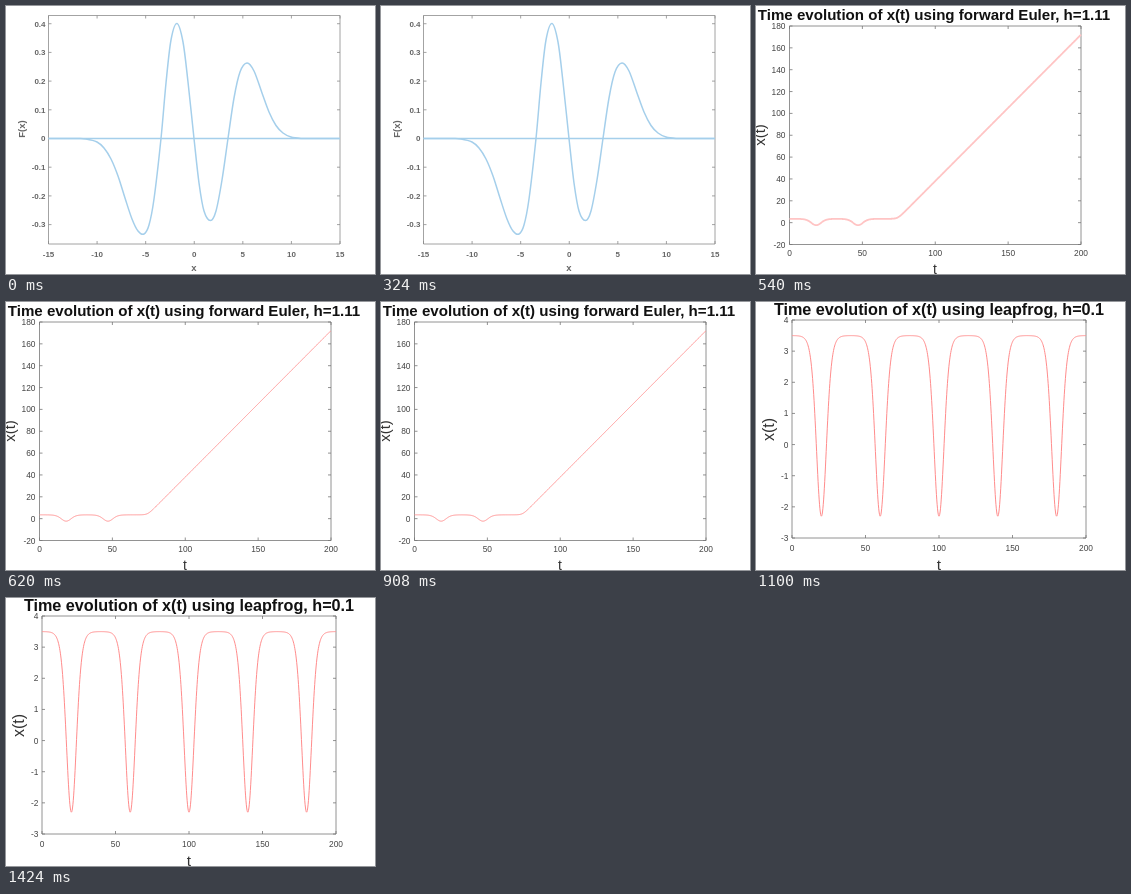
These frames come from a looping animation (369 px wide and 268 px high, 1.64 s). An HTML page:

```html
<!DOCTYPE html>
<html lang="en">
<head>
<meta charset="utf-8">
<title>Force and time evolution</title>
<style>
  html, body { margin: 0; width: 100%; height: 100%; overflow: hidden; background: #fff; }
  svg { display: block; width: 369px; height: 268px; }
  text { font-family: "Liberation Sans", Arial, sans-serif; }
  path { fill: none; }
</style>
</head>
<body>
<svg id="stage" viewBox="0 0 369 268"></svg>
<script>
const LOOP = 1640;
const stage = document.getElementById('stage');

function add(parent, tag, attrs, content) {
  const node = document.createElementNS('http://www.w3.org/2000/svg', tag);
  for (const key in attrs) node.setAttribute(key, attrs[key]);
  if (content !== undefined) node.textContent = content;
  parent.append(node);
  return node;
}

function label(parent, x, y, content, size, fill, extra = {}) {
  add(parent, 'text', { x, y, 'font-size': size, fill, 'text-anchor': 'middle', ...extra }, content);
}

// Boxed axes with inward ticks on all four sides.
function makePlot({ box: [l, t, r, b], xs: [x0, x1, dx], ys: [y0, y1, dy], ink, text, weight = 400, size, xBase, yEnd }) {
  const g = add(stage, 'g', {});
  const px = v => l + (v - x0) / (x1 - x0) * (r - l);
  const py = v => b - (v - y0) / (y1 - y0) * (b - t);
  const tick = 3, style = { 'font-weight': weight };
  let d = `M${l} ${t}H${r}V${b}H${l}Z`;
  for (let v = x0; v <= x1 + 1e-9; v += dx) {
    d += `M${px(v)} ${b}v${-tick}M${px(v)} ${t}v${tick}`;
    label(g, px(v), xBase, v, size, text, style);
  }
  for (let k = Math.ceil(y0 / dy); k * dy <= y1 + 1e-9; k++) {
    const v = k * dy;
    d += `M${l} ${py(v)}h${tick}M${r} ${py(v)}h${-tick}`;
    label(g, yEnd, py(v) + size * 0.36, +v.toFixed(1), size, text, { ...style, 'text-anchor': 'end' });
  }
  add(g, 'path', { d, stroke: ink, 'stroke-width': 0.8 });
  const curve = (f, stroke, width) => {
    const pts = [];
    for (let i = 0; i <= 800; i++) {
      const v = x0 + (x1 - x0) * i / 800;
      pts.push(px(v).toFixed(2) + ' ' + py(f(v)).toFixed(2));
    }
    return add(g, 'path', { d: 'M' + pts.join('L'), stroke, 'stroke-width': width, 'stroke-linejoin': 'round' });
  };
  return { g, curve };
}

function upright(g, x, y, content, size, fill, extra) {
  label(g, 0, 0, content, size, fill, { transform: `translate(${x} ${y}) rotate(-90)`, ...extra });
}

function smoothPath(p) {
  let d = 'M' + p[0];
  for (let i = 0; i < p.length - 1; i++) {
    const a = p[Math.max(i - 1, 0)], b = p[i], c = p[i + 1], e = p[Math.min(i + 2, p.length - 1)];
    d += `C${b[0] + (c[0] - a[0]) / 6} ${b[1] + (c[1] - a[1]) / 6} ` +
         `${c[0] - (e[0] - b[0]) / 6} ${c[1] - (e[1] - b[1]) / 6} ${c}`;
  }
  return d;
}

// Force
const force = makePlot({
  box: [42.5, 9.5, 334, 238], xs: [-15, 15, 5], ys: [-0.3676, 0.4286, 0.1],
  ink: '#8c8c8c', text: '#666', weight: 700, size: 8, xBase: 251, yEnd: 39.5
});
const forcePoints = [
  [42.5, 132.6], [70, 132.6], [80, 133], [91, 136], [98, 142], [105, 153], [112, 170], [119, 192],
  [126, 213], [132, 225], [138, 228], [143, 219], [148, 193], [155, 132.5], [160, 77], [165, 34],
  [171, 17.5], [177, 36], [182, 76], [188, 132.5], [193, 177], [198, 205], [204.5, 214.5],
  [210, 205], [216, 174], [222, 132.5], [228, 92], [234, 66], [241, 57], [248, 65], [256, 87],
  [263, 106], [270, 119.5], [277, 127], [285, 131], [295, 132.4], [310, 132.6], [334, 132.6]
];
add(force.g, 'path', { d: 'M42.5 132.6H334', stroke: '#a5cfeb', 'stroke-width': 1.5 });
add(force.g, 'path', { d: smoothPath(forcePoints), stroke: '#a5cfeb', 'stroke-width': 1.5 });
label(force.g, 188, 264.5, 'x', 9.5, '#666', { 'font-weight': 700 });
upright(force.g, 18.5, 123, 'F(x)', 9.5, '#666', { 'font-weight': 700 });

// Resting at 3.5 with a swing through the well, centred on t = 0.
const swing = t => 5.8 / (1 + 0.31 * (Math.cosh(0.52 * t) - 1));

// Forward Euler
const euler = makePlot({
  box: [33.5, 20, 325, 238.5], xs: [0, 200, 50], ys: [-20, 180, 20],
  ink: '#777', text: '#444', size: 8.4, xBase: 250, yEnd: 29.5
});
const escape = t => 1.34 * 1.3 * Math.log(1 + Math.exp((t - 74.2) / 1.3));
const eulerCurve = euler.curve(t => 3.5 - swing(t - 18.3) - swing(t - 47) + escape(t), '#ff9292', 1);
label(euler.g, 178, 14, 'Time evolution of x(t) using forward Euler, h=1.11', 15.1, '#111', { 'font-weight': 700 });
label(euler.g, 179, 268, 't', 14, '#333');
upright(euler.g, 8.5, 129, 'x(t)', 15, '#333');

// Leapfrog
const leap = makePlot({
  box: [36, 18, 330, 236], xs: [0, 200, 50], ys: [-3, 4, 1],
  ink: '#777', text: '#444', size: 8.4, xBase: 248.5, yEnd: 32.5
});
leap.curve(t => 3.5 - [20, 60, 100, 140, 180].reduce((sum, c) => sum + swing(t - c), 0), '#ff8c8c', 1);
label(leap.g, 183, 13, 'Time evolution of x(t) using leapfrog, h=0.1', 16.2, '#111', { 'font-weight': 700 });
label(leap.g, 183, 267.5, 't', 15.5, '#333');
upright(leap.g, 17.5, 127.5, 'x(t)', 16, '#333');

// Hard cuts: each step holds its values until the next time in ms.
function play(node, steps) {
  const frames = steps.map(([ms, values]) => ({ offset: ms / LOOP, easing: 'step-end', ...values }));
  frames.push({ ...frames[frames.length - 1], offset: 1 });
  node.animate(frames, { duration: LOOP, iterations: Infinity });
}
const on = { visibility: 'visible' }, off = { visibility: 'hidden' };
play(force.g, [[0, on], [540, off]]);
play(euler.g, [[0, off], [540, on], [1100, off]]);
play(leap.g, [[0, off], [1100, on]]);
play(eulerCurve, [
  [0, { stroke: '#ffc4c4', strokeWidth: '1.8px' }],
  [620, { stroke: '#ff9292', strokeWidth: '1px' }]
]);
</script>
</body>
</html>
```
